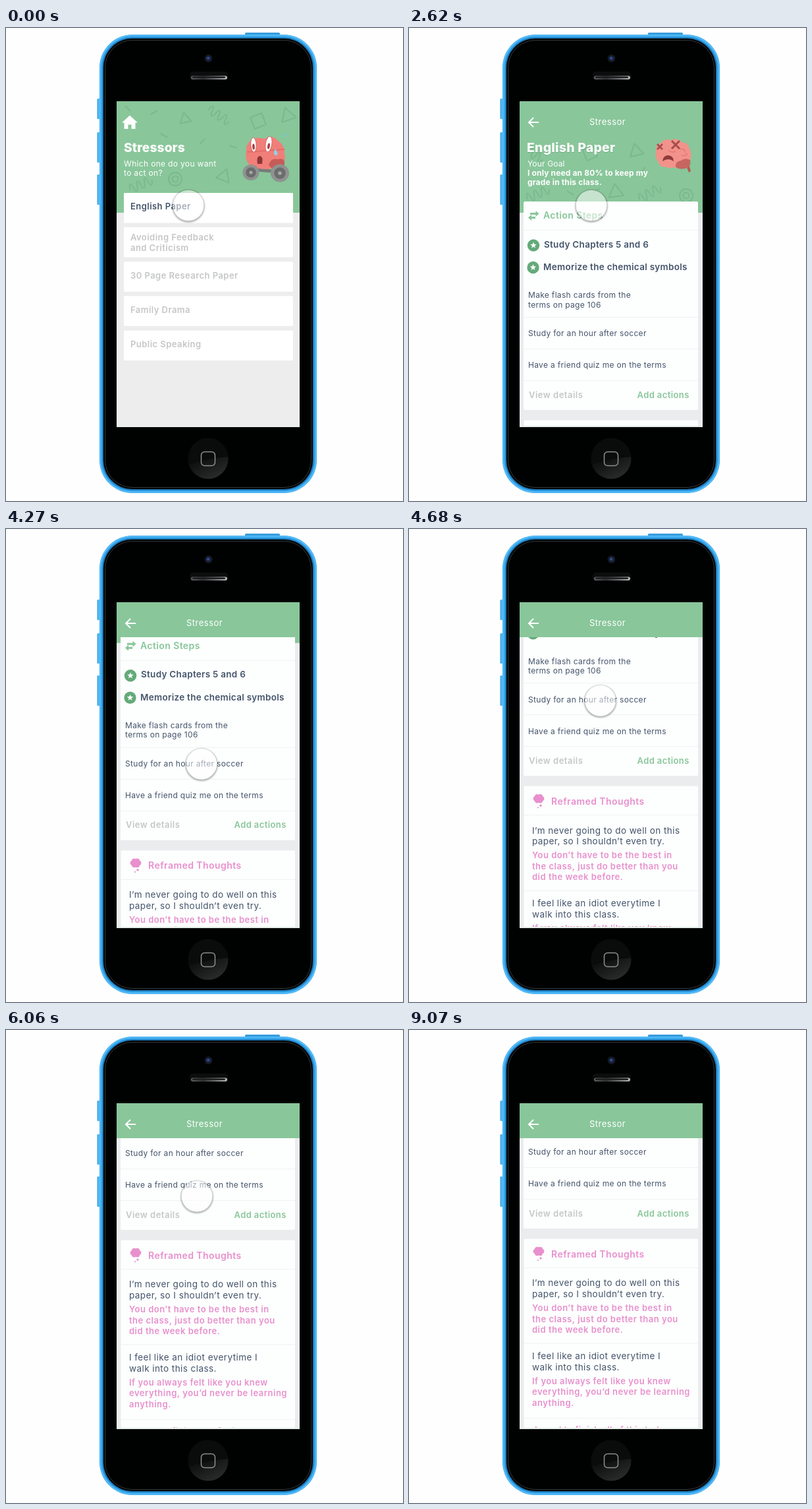
Recreate the animation shown at these times as an HTML page with a canvas. Size 603 by 717 pixels, loop 9.55 s.

```html
<!DOCTYPE html>
<html lang="en">
<head>
<meta charset="utf-8">
<title>Stressor app</title>
<style>
html, body { margin: 0; width: 100%; height: 100%; overflow: hidden; background: #fefefe; }
canvas { display: block; width: 603px; height: 717px; }
</style>
</head>
<body>
<canvas id="stage"></canvas>
<script>
const W = 603, H = 717, LOOP = 9550;
const GREEN = '#89c69a', LEAF = '#64aa79', INK = '#44546a', PINK = '#e890cd', PALE = '#c5c6c6';
const SCROLL = 278;
const dpr = window.devicePixelRatio || 1;
let c;

function layer(canvas) {
  canvas.width = W * dpr;
  canvas.height = H * dpr;
  const ctx = canvas.getContext('2d');
  ctx.scale(dpr, dpr);
  return ctx;
}

function text(str, x, y, size, weight, color, gap) {
  c.font = `${weight} ${size}px Inter, "Open Sans", sans-serif`;
  c.letterSpacing = (gap || 0) + 'px';
  c.fillStyle = color;
  c.fillText(str, x, y);
}

function lines(list, x, y, step, ...style) {
  list.forEach((s, i) => text(s, x, y + i * step, ...style));
}

function rect(x, y, w, h, color) {
  c.fillStyle = color;
  c.fillRect(x, y, w, h);
}

function round(x, y, w, h, r, fill, stroke, lw) {
  c.beginPath();
  c.roundRect(x, y, w, h, r);
  paint(fill, stroke, lw);
}

function paint(fill, stroke, lw) {
  if (fill) { c.fillStyle = fill; c.fill(); }
  if (stroke) { c.strokeStyle = stroke; c.lineWidth = lw || 1; c.stroke(); }
}

function oval(x, y, rx, ry, rot, fill, stroke, lw) {
  c.beginPath();
  c.ellipse(x, y, rx, ry, rot, 0, 7);
  paint(fill, stroke, lw);
}

function disc(x, y, r, fill, stroke, lw) {
  oval(x, y, r, r, 0, fill, stroke, lw);
}

function shape(d, fill, stroke, lw) {
  const p = new Path2D(d);
  if (fill) { c.fillStyle = fill; c.fill(p); }
  if (stroke) { c.strokeStyle = stroke; c.lineWidth = lw; c.stroke(p); }
}

function gradient(x0, y0, x1, y1, ...colors) {
  const g = c.createLinearGradient(x0, y0, x1, y1);
  colors.forEach((k, i) => g.addColorStop(i / (colors.length - 1), k));
  return g;
}

function clip(x, y, w, h, draw) {
  c.save();
  c.beginPath();
  c.rect(x, y, w, h);
  c.clip();
  draw();
  c.restore();
}

function phone() {
  rect(0, 0, W, H, '#fefefe');
  for (const [y, h] of [[107, 31], [158, 46], [222, 46]])
    round(138.5, y, 6, h, 1.5, gradient(138, 0, 145, 0, '#2b8fd2', '#5cc3fb', '#2e9be2'));
  round(363, 7, 53, 6, 1.5, gradient(0, 7, 0, 13, '#2b8fd2', '#5cc3fb'));
  round(142, 10, 330, 695, 50, '#2f9fe8');
  round(143.5, 11.5, 327, 692, 48.5, null, '#55bdf9', 2);
  round(146.5, 14.5, 321, 686, 45.5, '#1c6fa9');
  round(148, 16, 318, 683, 44, '#000202');
  round(150.5, 18.5, 313, 678, 41.5, null, '#34393b', 1);

  disc(307.5, 46, 6, '#14171f');
  disc(307.5, 46, 3.6, '#1c2c56');
  disc(307, 45.5, 1.5, '#3a5aa0');
  round(279, 66, 58, 13, 5, '#0c0d0d');
  round(281, 72.5, 55, 5.5, 2.7, gradient(281, 0, 336, 0, '#5c6061', '#303333', '#6f7374', '#b6babb'));
  round(283, 73.5, 50, 2.5, 1.2, '#1d2020');

  disc(307, 653, 30.5, gradient(290, 625, 318, 684, '#070808', '#111212', '#2b2d2d'));
  shape('M277 653A30 30 0 0 1 337 650Q308 652 277 662Z', '#0a0b0b');
  round(296.5, 642.5, 21, 21, 5, null, '#8b8f8f', 1.5);
}

// Faint confetti of squiggles, squares, triangles and rings
function squiggle(x, y, rot, n = 3) {
  c.save();
  c.translate(x, y);
  c.rotate(rot);
  c.beginPath();
  c.moveTo(-n * 6, 0);
  for (let i = 0; i < n; i++) {
    const a = (i - n / 2) * 12;
    c.bezierCurveTo(a + 2, -10, a + 5, -10, a + 6, 0);
    c.bezierCurveTo(a + 7, 8, a + 10, 8, a + 12, 0);
  }
  c.stroke();
  c.restore();
}

function polygon(x, y, r, n, rot) {
  c.beginPath();
  for (let i = 0; i < n; i++) {
    const a = rot + i * 2 * Math.PI / n;
    c.lineTo(x + r * Math.cos(a), y + r * Math.sin(a));
  }
  c.closePath();
  c.stroke();
}

function ring(x, y) {
  for (const r of [10, 4.5]) { c.beginPath(); c.arc(x, y, r, 0, 7); c.stroke(); }
}

function dash(x, y, rot) {
  const dx = 5 * Math.cos(rot), dy = 5 * Math.sin(rot);
  c.beginPath();
  c.moveTo(x - dx, y - dy);
  c.lineTo(x + dx, y + dy);
  c.stroke();
}

function confettiStyle() {
  c.strokeStyle = 'rgba(50,120,80,.16)';
  c.lineWidth = 2;
  c.lineCap = c.lineJoin = 'round';
}

function listConfetti() {
  c.save();
  confettiStyle();
  squiggle(323, 133, .55);
  squiggle(205, 238, -.4);
  polygon(383, 141, 13, 4, .4);
  polygon(272, 138, 10, 3, .3);
  polygon(331, 225, 12, 3, .9);
  polygon(428, 133, 13, 3, .2);
  ring(257, 229);
  dash(225, 128, -.5);
  dash(240, 163, .5);
  dash(298, 172, -.8);
  dash(345, 180, .3);
  dash(185, 122, .8);
  c.restore();
}

function detailConfetti() {
  c.save();
  confettiStyle();
  squiggle(366, 251, -.5);
  squiggle(196, 252, -.4);
  squiggle(192, 194, .5, 2);
  polygon(275, 190, 12, 4, .4);
  polygon(345, 187, 12, 3, .3);
  polygon(314, 249, 13, 3, .4);
  ring(421, 254);
  dash(245, 250, .5);
  dash(285, 246, -.5);
  dash(355, 215, -.7);
  c.restore();
}

function wheel(x, y, r) {
  oval(x, y, r, r * .96, 0, '#8f9290');
  disc(x, y, r * .62, '#6a6d6c');
  disc(x, y, r * .2, '#a6a9a7');
}

function buggy() {
  c.save();
  c.lineCap = 'round';
  shape('M368 214L417 218', null, '#777b79', 5);
  shape('M365 186Q364 177 372 170Q381 164 392 168Q405 161 413 171Q424 178 423 190Q426 203 418 211L396 214Q381 214 370 208Q362 199 365 186Z', '#f17f79');
  shape('M399 208Q402 196 413 199Q424 196 423 207Q418 214 404 213Z', '#c65c58');
  shape('M367 188L422 184', null, '#e16c68', 2);
  shape('M382 206Q380 194 386 194Q391 195 389 206Z', '#8f3638');
  shape('M409 183Q405 191 409 193Q414 193 412 188Z', '#8fd2e6');
  shape('M421 163Q419 166 424 165L427 158Z', '#7cc8c4');
  for (const [x, y, rx, ry, a] of [[376, 177, 4.2, 11, -.06], [399, 176, 4.8, 12, .16]]) {
    oval(x, y, rx, ry, a, '#fff', '#d86561', 1);
    oval(x, y + 3, 1.8, 4.5, a, '#a83c3f');
  }
  wheel(372, 219, 12.5);
  wheel(416, 220, 14);
  c.restore();
}

function cross(x, y, r, w) {
  shape(`M${x - r} ${y - r}L${x + r} ${y + r}M${x + r} ${y - r}L${x - r} ${y + r}`, null, '#a64d4c', w);
}

function brain() {
  shape('M419 204L425 219L428 217L424 203Z', '#b95855');
  shape('M375 188Q374 177 383 174Q388 167 398 170Q408 166 414 173Q425 174 426 183Q431 191 427 200Q424 209 412 209Q400 214 391 211Q380 211 378 202Q373 195 375 188Z', '#f2938b');
  shape('M405 211Q404 202 413 201Q419 196 427 200Q429 212 419 213Q411 215 405 211Z', '#c76660');
  shape('M411 184Q418 181 420 189M394 185Q399 190 405 187M414 193Q421 195 423 190', null, '#e27a74', 1.5);
  cross(381, 180, 4, 2.5);
  cross(405, 177, 6, 3);
  shape('M385 202Q386 193 394 193Q402 194 402 202Q394 196 385 202Z', '#8f3a3b');
}

function list() {
  rect(168, 111, 278, 494, '#ededee');
  rect(168, 111, 278, 169, GREEN);
  listConfetti();
  shape('M188 132.5L200 143.5H196.5V153H190.5V146.5H185.5V153H179.5V143.5H176Z', '#fff');
  text('Stressors', 179, 188, 19.2, 800, '#fff', .1);
  lines(['Which one do you want', 'to act on?'], 179, 210, 14, 12, 400, '#fff', .33);
  buggy();
  const rows = [['English Paper'], ['Avoiding Feedback', 'and Criticism'],
    ['30 Page Research Paper'], ['Family Drama'], ['Public Speaking']];
  rows.forEach((row, i) => {
    const y = 250 + i * 52.1;
    round(179, y, 257, 45.5, 1, '#fff');
    lines(row, 189, y + (row.length > 1 ? 19.5 : 25.3), 16.5, 13, 600, i ? PALE : INK, .45);
  });
}

function star(x, y) {
  disc(x, y, 9.2, LEAF);
  c.beginPath();
  for (let i = 0; i < 10; i++) {
    const r = i % 2 ? 2.1 : 5, a = i * Math.PI / 5 - Math.PI / 2;
    c.lineTo(x + r * Math.cos(a), y + r * Math.sin(a));
  }
  c.closePath();
  paint('#fff');
}

function bubble(x, y) {
  for (let i = 0; i < 6; i++) disc(x + 4.6 * Math.cos(i * 1.047), y + 3.6 * Math.sin(i * 1.047), 3.7, PINK);
  disc(x, y, 4, PINK);
  disc(x + 3, y + 10.5, 1.7, PINK);
  disc(x - 1, y + 13.5, 1.1, PINK);
}

function thought(y, said, better) {
  lines(said, 187, y, 16.7, 13.5, 400, INK, .43);
  lines(better, 187, y + 37.7, 16.5, 13, 600, PINK, .5);
}

function content() {
  rect(168, 111, 278, 169, GREEN);
  detailConfetti();
  text('English Paper', 179, 189, 19.4, 800, 'rgba(60,120,80,.35)', .25);
  text('English Paper', 179, 188, 19.4, 800, '#fff', .25);
  text('Your Goal', 180, 209.5, 12, 400, '#fff', .15);
  lines(['I only need an 80% to keep my', 'grade in this class.'], 180, 223.7, 14.5, 12, 700, '#fff', .15);
  brain();

  round(174, 263, 265, 316, 2, '#fdfefe');
  round(174.5, 594.5, 264.5, 420, 2, '#fdfefe');
  for (const y of [306, 438, 486, 534, 638, 752.5, 866]) rect(174, y, 265, 1, '#f0f1f2');

  shape('M181 287.5L186 283V286H192V289H186V292ZM197.5 281.5L192.500 277V280H184V283H192.500V286Z', GREEN);
  text('Action Steps', 204, 289, 14, 600, GREEN, .4);
  star(189, 329.5);
  star(188.5, 363);
  text('Study Chapters 5 and 6', 205, 332.5, 13.5, 600, INK, .28);
  text('Memorize the chemical symbols', 204, 367, 13.5, 600, INK, .28);
  const plain = [12, 400, INK, .32];
  lines(['Make flash cards from the', 'terms on page 106'], 181, 409.3, 14.4, ...plain);
  text('Study for an hour after soccer', 181, 467.3, ...plain);
  text('Have a friend quiz me on the terms', 181, 515.3, ...plain);
  text('View details', 182, 560.5, 13, 600, PALE, .5);
  text('Add actions', 346.5, 560.5, 13, 600, GREEN, .4);

  bubble(197, 613.5);
  text('Reframed Thoughts', 216, 622.7, 14, 600, PINK, .45);
  thought(666.3, ['I’m never going to do well on this', 'paper, so I shouldn’t even try.'],
    ['You don’t have to be the best in', 'the class, just do better than you', 'did the week before.']);
  thought(777, ['I feel like an idiot everytime I', 'walk into this class.'],
    ['If you always felt like you knew', 'everything, you’d never be learning', 'anything.']);
  text('I need to finish all of this today', 191, 889, 13, 600, PINK, .4);
}

function detail(scroll) {
  rect(168, 111, 278, 494, '#ebecee');
  rect(168, 111, 278, 53, GREEN);
  clip(168, 164, 278, 439, () => {
    c.translate(0, -scroll);
    content();
  });
  rect(168, 603, 278, 2, '#e4efe7');
  shape('M197 143H182.500M189 136L182 143L189 150', null, '#fff', 2);
  text('Stressor', 274, 147, 13, 400, '#fff', .5);
}

function cursor(x, y) {
  c.save();
  c.beginPath();
  c.rect(x - 40, y - 40, 80, 80);
  c.arc(x, y, 23.3, 0, 7);
  c.clip('evenodd');
  const g = c.createRadialGradient(x, y + 1, 21.5, x, y + 1, 26.5);
  g.addColorStop(0, 'rgba(0,0,0,.42)');
  g.addColorStop(.5, 'rgba(0,0,0,.2)');
  g.addColorStop(1, 'rgba(0,0,0,0)');
  disc(x, y + 1, 27, g);
  c.restore();
  disc(x, y, 23.3, 'rgba(255,255,255,.52)');
}

const ramp = (t, a, b) => Math.min(1, Math.max(0, (t - a) / (b - a)));
const ease = p => p < .5 ? 4 * p ** 3 : 1 - (2 - 2 * p) ** 3 / 2;
const mix = (a, b, p) => a + (b - a) * p;

// Finger: lightly underdamped spring; page: critically damped follow
function flick(t) {
  const s = .00242, w = .00253;
  return 1 - Math.exp(-s * t) * (Math.cos(w * t) + s / w * Math.sin(w * t));
}

function scrollAt(t) {
  if (t >= 7410) return SCROLL;
  const x = Math.max(0, t - 3845) / 319;
  return SCROLL * (1 - (1 + x) * Math.exp(-x));
}

function cursorAt(t) {
  if (t < 3800) {
    const p = ease(ramp(t, 2620, 3440));
    return [mix(277, 305, p), mix(269, 478, p)];
  }
  if (t < 8250) {
    const p = t < 7410 ? flick(Math.max(0, t - 3840)) : 1;
    return [mix(305, 290, p), mix(478, 252, p)];
  }
  const p = ease(ramp(t, 8250, 9070));
  return [mix(290, 556, p), mix(252, 748, p)];
}

const main = layer(document.getElementById('stage'));
const phoneArt = document.createElement('canvas');
const listArt = document.createElement('canvas');
c = layer(phoneArt);
phone();
c = layer(listArt);
list();
c = main;

function render(t) {
  c.drawImage(phoneArt, 0, 0, W, H);
  const fade = ease(ramp(t, 300, 950));
  detail(scrollAt(t));
  if (fade < 1) {
    c.globalAlpha = 1 - fade;
    c.drawImage(listArt, 0, 0, W, H);
    c.globalAlpha = 1;
  }
  if (t < 9070) cursor(...cursorAt(t));
}

const start = performance.now();
function tick() {
  render((performance.now() - start) % LOOP);
  requestAnimationFrame(tick);
}
tick();
</script>
</body>
</html>
```
